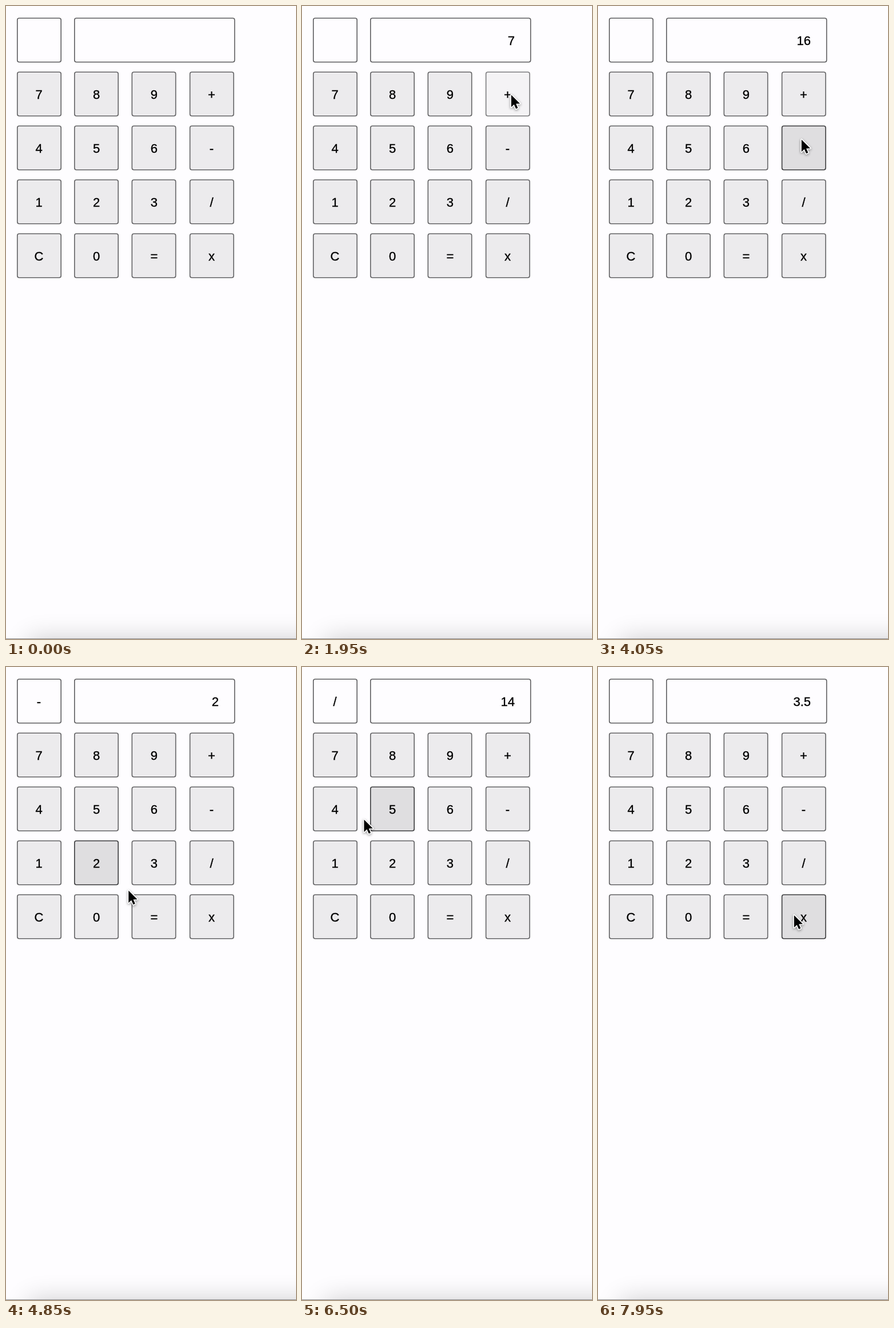
These frames come from a looping animation (507x1104 px, 8000 ms). An HTML page with a canvas:

```html
<!DOCTYPE html>
<html lang="en">
<head>
<meta charset="utf-8">
<title>Calculator</title>
<style>
  html, body { margin: 0; width: 100%; height: 100%; overflow: hidden; background: #fefdff; }
  canvas { display: block; }
</style>
</head>
<body>
<canvas width="507" height="1104"></canvas>
<script>
const ctx = document.querySelector('canvas').getContext('2d');
const LOOP = 8000, STEP = 50, SIZE = 78;
const LAYOUT = ['789+', '456-', '123/', 'C0=x'];

const STYLES = {
  idle: ['#ecebed', '#626264'],
  hover: ['#dfdee0', '#3b3b3d'],
  active: ['#f4f3f5', '#7b7b7d'],
  field: ['#fefdff', '#5c5c5e']
};

const rowTop = row => 20.5 + 94 * row;
const textX = col => 57.5 + 100.65 * col;

const buttons = LAYOUT.flatMap((keys, row) => [...keys].map((key, col) => ({
  key, textX: textX(col), x: [19, 119, 219.5, 320.8][col], y: rowTop(row + 1)
})));

// Pointer script: stops on keys and free points between them
const via = (arrive, x, y) => ({ arrive, leave: arrive, x, y });

function stop(key, arrive, rest = 250, dx = 5, dy = 0) {
  const b = buttons.find(button => button.key === key);
  return { key, arrive, leave: arrive + rest, x: b.x + SIZE / 2 + dx, y: b.y + SIZE / 2 + dy };
}

const stops = [
  via(250, 456, 436),
  stop('7', 1050, 200, 12, 4), stop('+', 1850, 200), stop('9', 2250, 300),
  via(2750, 318, 415), stop('=', 2950, 300, 15),
  stop('-', 4050, 250, -5, -16), stop('2', 4600, 150), stop('=', 4950, 500),
  stop('/', 5900, 300, -12, 17), stop('4', 6600, 200),
  via(7050, 279, 389), stop('=', 7150, 600),
  stop('x', 7950, 50, -18, -4)
];

const points = stops.flatMap(({ arrive, leave, x, y }) =>
  leave > arrive ? [{ t: arrive, x, y }, { t: leave, x, y }] : [{ t: arrive, x, y }]);

// Each stop ends in a click, which updates the calculator
const OPERATE = {
  '+': (a, b) => a + b,
  '-': (a, b) => a - b,
  '/': (a, b) => a / b,
  'x': (a, b) => a * b
};

let state = { stored: 0, operator: '', value: '' };
const clicks = stops.filter(s => s.key).map(({ key, arrive, leave }) => {
  const { stored, operator, value } = state;
  if (key === '=') state = { stored, operator: '', value: OPERATE[operator](+stored, +value) };
  else if (OPERATE[key]) state = { stored: value, operator: key, value };
  else state = { stored, operator, value: key };
  return { down: arrive + 100, up: Math.min(arrive + 200, leave), ...state };
}).filter(click => click.up > click.down || click.down < LOOP);

function slope(i, axis) {
  const a = points[i], b = points[i + 1];
  return a && b ? (b[axis] - a[axis]) / (b.t - a.t) : 0;
}

// Harmonic mean keeps each axis free of overshoot
function tangent(i, axis) {
  const a = slope(i - 1, axis), b = slope(i, axis);
  return a * b > 0 ? 2 * a * b / (a + b) : 0;
}

function pointerAt(t) {
  if (t < points[0].t) return null;
  const i = points.findLastIndex((p, n) => p.t <= t && n < points.length - 1);
  const a = points[i], b = points[i + 1], span = b.t - a.t;
  const u = Math.min(1, (t - a.t) / span), v = 1 - u;
  const [x, y] = ['x', 'y'].map(axis =>
    a[axis] * v * v * (1 + 2 * u) + b[axis] * u * u * (3 - 2 * u) +
    span * u * v * (tangent(i, axis) * v - tangent(i + 1, axis) * u));
  return { x, y };
}

function box(x, y, w, [fill, border]) {
  ctx.beginPath();
  ctx.roundRect(x + 0.8, y + 0.8, w - 1.6, SIZE - 1.6, 3.2);
  ctx.fillStyle = fill;
  ctx.fill();
  ctx.strokeStyle = border;
  ctx.lineWidth = 1.6;
  ctx.stroke();
}

function label(text, x, top, align = 'center') {
  ctx.font = '22px "Liberation Sans", Arial, sans-serif';
  ctx.textAlign = align;
  ctx.fillStyle = ctx.strokeStyle = '#000';
  ctx.lineWidth = 0.35;
  ctx.fillText(text, x, top + 47.5);
  ctx.strokeText(text, x, top + 47.5);
}

function drawBackground() {
  ctx.fillStyle = '#fefdff';
  ctx.fillRect(0, 0, 507, 1104);
  // Soft shadow of a panel lying just below the stage
  ctx.save();
  ctx.shadowColor = 'rgba(0,0,0,0.2)';
  ctx.shadowBlur = 42;
  ctx.shadowOffsetY = -1000;
  ctx.fillStyle = '#000';
  ctx.fillRect(40, 2104, 700, 300);
  ctx.restore();
  ctx.fillStyle = '#8c8c8e';
  ctx.fillRect(0, 1103, 507, 1);
}

function drawPointer({ x, y }) {
  ctx.save();
  ctx.translate(x + 1, y + 1.5);
  ctx.scale(0.89, 0.89);
  ctx.beginPath();
  ctx.moveTo(0, 0);
  ctx.lineTo(0, 24);
  ctx.lineTo(5.5, 18.8);
  ctx.lineTo(9.3, 27.2);
  ctx.lineTo(13, 25.6);
  ctx.lineTo(9.3, 17.4);
  ctx.lineTo(17.2, 17);
  ctx.closePath();
  ctx.lineWidth = 3.8;
  ctx.lineJoin = 'round';
  ctx.strokeStyle = '#fff';
  ctx.shadowColor = 'rgba(0,0,0,0.4)';
  ctx.shadowBlur = 4;
  ctx.shadowOffsetY = 1.5;
  ctx.stroke();
  ctx.shadowColor = 'transparent';
  ctx.fillStyle = '#000';
  ctx.fill();
  ctx.restore();
}

function draw(t) {
  const pointer = pointerAt(t), hot = pointerAt(t - STEP);
  const pressed = clicks.some(({ down, up }) => t >= down && t < up);
  const shown = clicks.findLast(({ up }) => t >= up) || { operator: '', value: '' };

  drawBackground();
  box(19, rowTop(0), SIZE, STYLES.field);
  box(119, rowTop(0), 281.5, STYLES.field);
  label(shown.operator, textX(0), rowTop(0));
  label(shown.value, 372, rowTop(0), 'right');

  for (const { key, x, y, textX } of buttons) {
    const over = hot && hot.x >= x && hot.x <= x + SIZE && hot.y >= y && hot.y <= y + SIZE;
    box(x, y, SIZE, STYLES[over ? (pressed ? 'active' : 'hover') : 'idle']);
    label(key, textX, y);
  }

  if (pointer) drawPointer(pointer);
}

const start = performance.now();
function tick() {
  const t = (performance.now() - start) % LOOP;
  draw(Math.floor(t / STEP) * STEP);
  requestAnimationFrame(tick);
}
tick();
</script>
</body>
</html>
```
